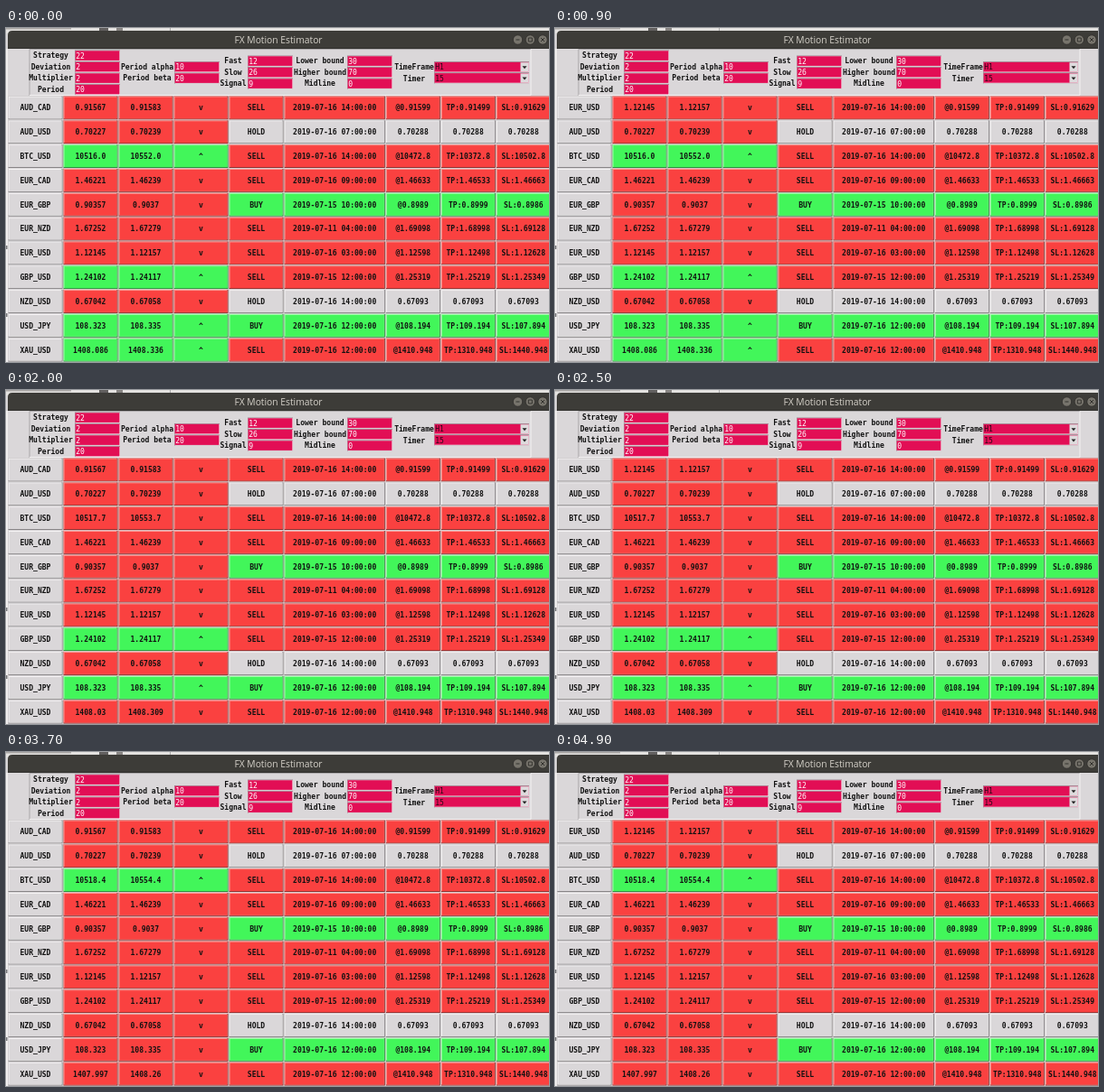
These frames come from a looping animation (600x370 px, 5000 ms). An HTML page:

```html
<!DOCTYPE html>
<html lang="en">
<head>
<meta charset="utf-8">
<title>FX Motion Estimator</title>
<style>
html, body { margin: 0; width: 100%; height: 100%; overflow: hidden; background: #dad7d9; }
svg { display: block; width: 600px; height: 370px; }
text { font: bold 8.07px "DejaVu Sans Mono", "Liberation Mono", monospace; fill: #111; white-space: pre; }
.title { font: 500 10.3px "Open Sans", "Noto Sans", sans-serif; fill: #d5d1c9; }
.value { font-weight: normal; fill: #fff; }
.choice { font-weight: normal; fill: #2b0715; }
</style>
</head>
<body>
<svg id="stage" viewBox="0 0 600 370"></svg>
<script>
const NS = "http://www.w3.org/2000/svg";
const stage = document.getElementById("stage");
const LOOP = 5000, TOP = 75, PITCH = 26.82;
const EDGES = [2, 63, 124, 185, 246, 307, 419.3, 480.3, 541.3, 602.3];
const GRAY = "#dad7d9";
const PAINT = {
  gray: [GRAY, "#f7f5f6", "#858284"],
  red: ["#fa4140", "#ff9c98", "#8f2a29"],
  green: ["#42f65a", "#a5ffae", "#278f38"]
};

// pair | bid | ask | signal | day hour | entry | take profit | stop loss
const ROWS = `AUD_CAD|0.91567|0.91583|SELL|16 14|0.91599|0.91499|0.91629
AUD_USD|0.70227|0.70239|HOLD|16 07|0.70288|0.70288|0.70288
BTC_USD|10516.0|10552.0|SELL|16 14|10472.8|10372.8|10502.8
EUR_CAD|1.46221|1.46239|SELL|16 09|1.46633|1.46533|1.46663
EUR_GBP|0.90357|0.9037|BUY|15 10|0.8989|0.8999|0.8986
EUR_NZD|1.67252|1.67279|SELL|11 04|1.69098|1.68998|1.69128
EUR_USD|1.12145|1.12157|SELL|16 03|1.12598|1.12498|1.12628
GBP_USD|1.24102|1.24117|SELL|15 12|1.25319|1.25219|1.25349
NZD_USD|0.67042|0.67058|HOLD|16 14|0.67093|0.67093|0.67093
USD_JPY|108.323|108.335|BUY|16 12|108.194|109.194|107.894
XAU_USD|1408.086|1408.336|SELL|16 12|1410.948|1310.948|1440.948`
  .split("\n").map(line => line.split("|"));

// Quotes that differ between refreshes, and the rows that rise
const QUOTES = [
  { up: [2, 7, 9, 10], 2: ["10516.0", "10552.0"], 10: ["1408.086", "1408.336"] },
  { up: [7, 9], 2: ["10517.7", "10553.7"], 10: ["1408.03", "1408.309"] },
  { up: [2], 2: ["10518.4", "10554.4"], 10: ["1407.997", "1408.26"] }
];

// start time, quote set, first row still shows EUR_USD, rows being rebuilt
const STEPS = [
  [0, 0, false, false], [700, 0, true, false], [1500, 0, true, true],
  [1700, 1, false, false], [2300, 1, true, false], [2600, 1, true, true],
  [2800, 2, false, false], [4500, 2, true, false]
];

function add(tag, attrs, parent = stage) {
  const el = document.createElementNS(NS, tag);
  for (const key in attrs) el.setAttribute(key, attrs[key]);
  parent.appendChild(el);
  return el;
}

function rect(x, y, width, height, fill, parent) {
  return add("rect", { x, y, width, height, fill }, parent);
}

function label(str, x, y, anchor = "middle", cls = "", parent = stage) {
  const el = add("text", { x, y, "text-anchor": anchor, class: cls }, parent);
  el.textContent = str;
  return el;
}

function makeCell(row, col) {
  const g = add("g", {});
  const x = EDGES[col], y = TOP + row * PITCH;
  const w = EDGES[col + 1] - x, h = PITCH;
  rect(x, y, w, h, GRAY, g);
  const dark = rect(x + 0.5, y + 0.5, w - 1, h - 1, "", g);
  const light = rect(x + 0.5, y + 0.5, w - 2, h - 2, "", g);
  const face = rect(x + 1.5, y + 1.5, w - 3, h - 3, "", g);
  const text = label("", x + w / 2, y + 16.3, "middle", "", g);
  return {
    set(str, tone) {
      const [fill, hi, lo] = PAINT[tone];
      face.setAttribute("fill", fill);
      light.setAttribute("fill", hi);
      dark.setAttribute("fill", lo);
      text.textContent = str;
    },
    show(on) { g.setAttribute("visibility", on ? "visible" : "hidden"); }
  };
}

function field(x, y, w, str, cls = "value") {
  rect(x, y, w, 12, "#8d7580");
  rect(x + 0.6, y + 0.7, w - 0.6, 11.3, "#f5eef1");
  rect(x + 0.6, y + 0.7, w - 1.2, 10.6, "#e20e55");
  label(str, x + 1.2, y + 9.1, "start", cls);
}

function drawWindow() {
  rect(0, 0, 600, 370, "#dad7d9");
  rect(0, 0, 600, 6, "#e4e2e0");
  rect(0, 0, 72, 1.5, "#aaa7a5");
  rect(103, 0, 10, 3, "#62605f");
  rect(122, 0, 7, 3, "#888583");
  rect(181, 0, 1, 3, "#aaa");
  add("path", { d: "M2 23V8Q2 3 7 3H600V23Z", fill: "#3d3c38" });
  rect(2, 22, 598, 1, "#302f2c");
  label("FX Motion Estimator", 301, 16.7, "middle", "title");
  [565.5, 579.3, 593].forEach((cx, i) => {
    add("circle", { cx, cy: 13, r: 5.2, fill: "#77746c", stroke: "#2e2d2a", "stroke-width": 0.8 });
    const d = ["M-2 0H2", "M-2 -2H2V2H-2Z", "M-2 -2L2 2M2 -2L-2 2"][i];
    add("path", { d, transform: `translate(${cx} 13)`, fill: "none", stroke: "#33322e" });
  });
  rect(0, 23, 2, 347, "#f1efef");
  rect(0, 241, 1.5, 4, "#77777a");
  rect(0, 316, 1.5, 4, "#77777a");
}

function drawForm() {
  add("path", { d: "M26 75V23.5H580", fill: "none", stroke: "#aaa7a9" });
  add("path", { d: "M26 74.5H580V23.5", fill: "none", stroke: "#f3f1f2" });
  const groups = [
    [49.5, 76, 24.6, [["Strategy", 22], ["Deviation", 2], ["Multiplier", 2], ["Period", 20]]],
    [156, 186, 37.1, [["Period alpha", 10], ["Period beta", 20]]],
    [251, 267, 30.6, [["Fast", 12], ["Slow", 26], ["Signal", 9]]],
    [347, 377, 30.6, [["Lower bound", 30], ["Higher bound", 70], ["Midline", 0]]]
  ];
  for (const [cx, x, y, items] of groups) {
    items.forEach(([name, value], i) => {
      label(name, cx, y + i * 12.5 + 8.4);
      field(x, y + i * 12.5, 50, value);
    });
  }
  [["TimeFrame", "H1"], ["Timer", "15"]].forEach(([name, value], i) => {
    const y = 37.2 + i * 12.2;
    label(name, 451, y + 9.2);
    field(473, y, 105, value, "choice");
    rect(568.5, y + 1, 9, 10.3, "#dedbdd");
    add("path", { d: `M570.5 ${y + 5}h5l-2.5 3Z`, fill: "#222" });
  });
}

drawWindow();
drawForm();
const bands = ROWS.map((_, r) => {
  const y = TOP + r * PITCH;
  return rect(63, y, 182.5, PITCH - 0.5, PAINT.red[0]);
});
const cells = ROWS.map((_, r) => EDGES.slice(1).map((_, c) => makeCell(r, c)));

ROWS.forEach(([, , , signal, when, entry, take, stop], r) => {
  const tone = { SELL: "red", BUY: "green", HOLD: "gray" }[signal];
  const mark = signal === "HOLD" ? ["", "", ""] : ["@", "TP:", "SL:"];
  const values = [signal, `2019-07-${when}:00:00`, mark[0] + entry, mark[1] + take, mark[2] + stop];
  values.forEach((value, i) => cells[r][i + 4].set(value, tone));
});

function render(time) {
  const [, set, stale, rebuilding] = STEPS.filter(step => step[0] <= time).pop();
  const quotes = QUOTES[set];
  const next = QUOTES[Math.min(set + 1, QUOTES.length - 1)];
  ROWS.forEach((row, r) => {
    const source = r === 0 && stale ? ROWS[6] : row;
    const [bid, ask] = quotes[r] || source.slice(1, 3);
    const up = quotes.up.includes(r);
    const tone = up ? "green" : "red";
    cells[r][0].set(source[0], "gray");
    [bid, ask, up ? "^" : "v"].forEach((value, i) => cells[r][i + 1].set(value, tone));
    cells[r][0].show(!rebuilding || r < 5);
    for (let c = 1; c < 4; c++) cells[r][c].show(!rebuilding || r < 4);
    bands[r].setAttribute("fill", PAINT[next.up.includes(r) ? "green" : "red"][0]);
  });
}

const start = performance.now();
let shown = -1;
function frame() {
  const time = (performance.now() - start) % LOOP;
  const tick = Math.floor(time / 100);
  if (tick !== shown) render(time);
  shown = tick;
  requestAnimationFrame(frame);
}
render(0);
requestAnimationFrame(frame);
</script>
</body>
</html>
```
